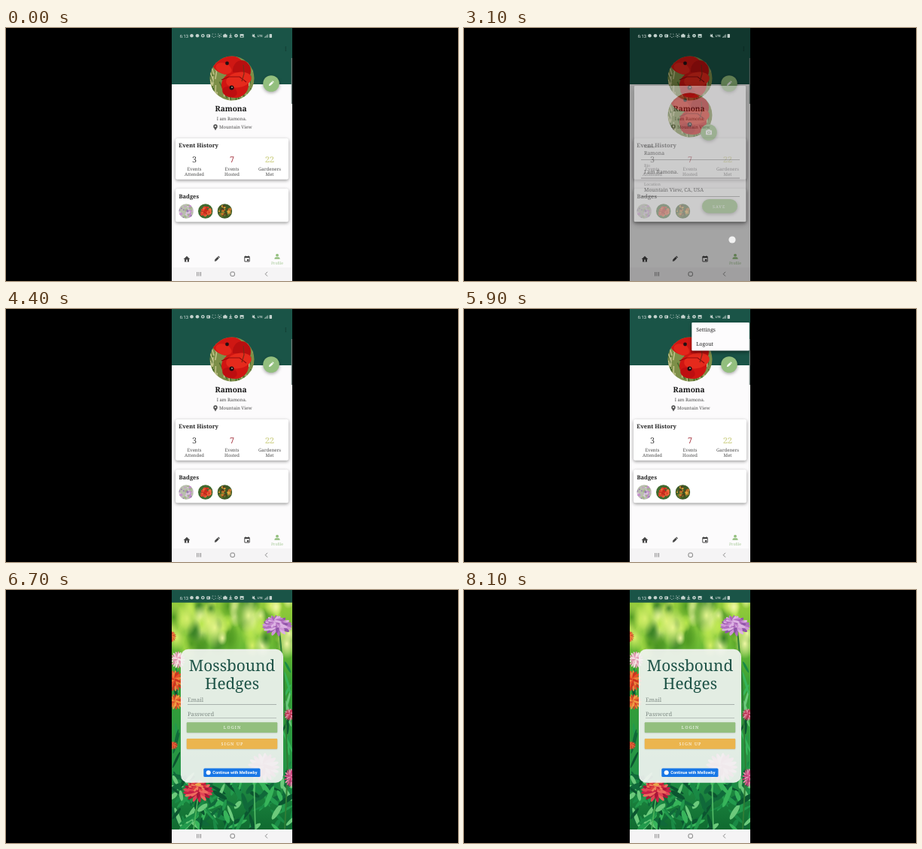
These frames come from a looping animation (600x337 px, 8.2 s). An HTML page with a canvas:

```html
<!DOCTYPE html>
<html lang="en">
<head>
<meta charset="utf-8">
<title>Garden app walkthrough</title>
<style>
html, body { margin: 0; width: 100%; height: 100%; overflow: hidden; background: #000; }
canvas { display: block; width: 600px; height: 337px; }
</style>
</head>
<body>
<canvas id="stage" width="600" height="337"></canvas>
<script>
const W = 600, H = 337, LOOP = 8200, STEP = 100;
const SERIF = '"Noto Serif", serif', SANS = 'Roboto, sans-serif';
const GREEN = '#1a5447', LEAF = '#93bf7e', INK = '#222', GREY = '#4d4d4d';
const USER = 'Ramona';

const screen = document.getElementById('stage').getContext('2d');
let c = screen;

// Paint a static picture once so that it can be faded as a whole.
function layer(paint) {
  const canvas = document.createElement('canvas');
  canvas.width = W;
  canvas.height = H;
  c = canvas.getContext('2d');
  c.textRendering = 'geometricPrecision';
  paint();
  c = screen;
  return canvas;
}

function rect(x, y, w, h, fill, r = 0) {
  c.fillStyle = fill;
  c.beginPath();
  c.roundRect(x, y, w, h, r);
  c.fill();
}

function oval(x, y, rx, ry, fill, turn = 0) {
  c.fillStyle = fill;
  c.beginPath();
  c.ellipse(x, y, rx, ry, turn, 0, 7);
  c.fill();
}

const disc = (x, y, r, fill) => oval(x, y, r, r, fill);

function poly(points, fill) {
  c.fillStyle = fill;
  c.beginPath();
  points.forEach(([x, y]) => c.lineTo(x, y));
  c.fill();
}

function line(points, color, width = 1) {
  c.strokeStyle = color;
  c.lineWidth = width;
  c.beginPath();
  points.forEach(([x, y]) => c.lineTo(x, y));
  c.stroke();
}

function text(str, x, y, size, color, { align = 'left', weight = 400, font = SERIF, gap = 0 } = {}) {
  c.font = `${weight} ${size}px ${font}`;
  c.letterSpacing = gap + 'px';
  c.textAlign = align;
  c.fillStyle = color;
  c.fillText(str, x + (align === 'center' ? gap / 2 : 0), y);
}

const centered = (str, x, y, size, color, more) => text(str, x, y, size, color, { align: 'center', ...more });

function raised(paint, blur = 4, drop = 1.5, alpha = 0.4) {
  c.save();
  c.shadowColor = `rgba(0,0,0,${alpha})`;
  c.shadowBlur = blur;
  c.shadowOffsetY = drop;
  paint();
  c.restore();
}

function clipped(path, paint) {
  c.save();
  c.beginPath();
  path();
  c.clip();
  paint();
  c.restore();
}

function seeded(seed) {
  return () => {
    seed = (seed * 16807) % 2147483647;
    return seed / 2147483647;
  };
}

function pencil(x, y, s, color) {
  c.save();
  c.translate(x, y);
  c.rotate(Math.PI / 4);
  rect(-s * 0.2, -s * 0.38, s * 0.4, s * 0.8, color);
  rect(-s * 0.2, -s * 0.65, s * 0.4, s * 0.19, color);
  poly([[-s * 0.2, s * 0.42], [s * 0.2, s * 0.42], [0, s * 0.68]], color);
  c.restore();
}

function poppies(x, y) {
  clipped(() => c.arc(x, y, 29.5, 0, 7), () => {
    c.translate(x, y);
    rect(-30, -30, 60, 60, '#7d8f48');
    const rnd = seeded(41);
    for (let i = 0; i < 50; i++) {
      const px = rnd() * 60 - 30, py = rnd() * 60 - 30;
      line([[px, py], [px + rnd() * 8 - 2, py + 11]], i % 2 ? '#c3c48c' : '#486a2a', 1.5);
    }
    oval(-5, -18, 21, 13, '#cf1713', 0.1);
    oval(13, -10, 12, 14, '#b80f0f');
    oval(-11, -13, 11, 7, '#e3261b', 0.4);
    oval(4, 9, 18, 17, '#d01512');
    oval(9, 2, 17, 10, '#e52a1c', -0.2);
    oval(-3, 18, 10, 7, '#bd0e10', 0.3);
    line([[-14, 2], [-4, -2], [10, -2], [19, 5]], '#8d0b0d', 1.2);
    line([[15, -18], [16, -6], [13, 4]], '#7c2a16', 1.2);
    disc(-6.5, -20, 2.4, '#241012');
    disc(-0.5, 12.5, 3, '#1d0c10');
    disc(0, 12, 1, '#a9a08a');
  });
}

function badge(x, back, tones, seed, spread) {
  clipped(() => c.arc(x, 244, 9.8, 0, 7), () => {
    rect(x - 10, 234, 20, 20, back);
    const rnd = seeded(seed);
    for (let i = 0; i < 38; i++) {
      const a = rnd() * 7, d = Math.sqrt(rnd()) * spread;
      disc(x + Math.cos(a) * d, 244 + Math.sin(a) * d, 0.9 + rnd() * 1.3, tones[i % tones.length]);
    }
  });
}

function systemBar() {
  const tint = '#6f6f6f';
  rect(220, 319, 160, 18, '#f5f4f5');
  for (const x of [253.7, 256.1, 258.5]) line([[x, 325], [x, 330.5]], tint, 0.8);
  c.lineWidth = 0.9;
  c.beginPath();
  c.roundRect(298, 325, 5.4, 5.4, 1.6);
  c.stroke();
  line([[347, 324.8], [344.2, 327.7], [347, 330.6]], tint, 0.8);
}

function statusBar() {
  const tint = '#c3d2cd';
  text('6:13', 230.7, 12.7, 5.9, '#d9e3e0', { font: SANS });
  for (const x of [246.5, 254, 261.3, 305.5]) disc(x, 10.3, 2.3, tint);
  disc(261.3, 10.3, 1, GREEN);
  disc(305.5, 10.3, 0.8, GREEN);
  rect(266.3, 8.6, 4.8, 3.8, tint, 0.6);
  rect(267.4, 9.8, 1.7, 1.3, GREEN);
  for (const x of [276, 283.5]) {
    c.setLineDash([1.5, 2]);
    line([[x - 2.2, 8], [x + 2.2, 8], [x + 2.2, 12.5], [x - 2.2, 12.5], [x - 2.2, 8]], tint, 0.7);
    c.setLineDash([]);
  }
  rect(282.7, 9.5, 1.6, 1.6, tint);
  rect(288.2, 8.8, 5.4, 3.8, tint, 0.6);
  rect(289.8, 7.8, 2.2, 1.2, tint);
  rect(297.6, 7.6, 1, 3, tint);
  poly([[296, 10], [300.2, 10], [298.1, 12]], tint);
  rect(296, 12.2, 4.2, 0.8, tint);
  rect(310.6, 8, 5, 4.8, tint, 0.6);
  poly([[311.3, 12], [313, 9.9], [314.9, 12]], GREEN);
  poly([[326.8, 9.3], [328.2, 9.3], [330, 7.8], [330, 12.9], [328.2, 11.5], [326.8, 11.5]], tint);
  line([[327, 7.8], [331.6, 12.8]], tint, 0.7);
  text('LTE', 333.8, 12.2, 4.2, tint, { font: SANS, weight: 700 });
  for (let i = 0; i < 4; i++) rect(343.2 + i * 1.2, 11.8 - i * 1.1, 0.8, 1 + i * 1.1, tint);
  rect(349.6, 8, 3.4, 4.9, tint, 0.7);
}

function bottomNav() {
  poly([[235.7, 308], [240, 303.8], [244.3, 308]], '#444');
  rect(237, 307, 6, 4.5, '#444');
  rect(239.2, 308.6, 1.6, 3, '#fcfbfc');
  pencil(280, 307.5, 6.6, '#444');
  rect(316.3, 304, 7.4, 7.4, '#444', 0.8);
  rect(317.2, 306.2, 5.6, 4.3, '#fcfbfc');
  rect(320, 308, 2.3, 2.2, '#444');
  rect(317.7, 303.2, 0.9, 1.2, '#444');
  rect(321.4, 303.2, 0.9, 1.2, '#444');
  disc(360, 302.7, 1.9, LEAF);
  rect(356.4, 305.2, 7.2, 2.6, LEAF, [2, 2, 0, 0]);
  centered('Profile', 360, 314.5, 5.1, '#a5c996');
}

function fab(x, y) {
  raised(() => disc(x, y, 10.8, LEAF), 4, 1.5, 0.35);
}

function profilePage() {
  rect(220, 0, 160, H, '#fcfbfc');
  rect(220, 0, 160, 75, GREEN);
  for (const y of [25.5, 27.7, 29.9]) disc(371.3, y, 0.75, '#10362e');
  rect(378.7, 40, 1.3, 61, '#6f7f7a');
  poppies(300, 67);
  fab(352, 74);
  pencil(352, 74, 6.4, '#fff');

  centered(USER, 298.6, 110.8, 10.1, '#151515', { weight: 700 });
  centered(`I am ${USER}.`, 299.5, 123, 6, GREY);
  disc(278, 130.9, 2.7, '#555');
  poly([[275.5, 131.9], [280.5, 131.9], [278, 136.4]], '#555');
  disc(278, 130.9, 1, '#fcfbfc');
  text('Mountain View', 283, 134.4, 5.95, GREY);

  raised(() => rect(225, 147, 150, 54.8, '#fff', 2.5));
  text('Event History', 229.3, 159.4, 7.6, INK, { weight: 700 });
  const stats = [
    [250, '3', '#444', 'Events', 'Attended'],
    [300, '7', '#a5343f', 'Events', 'Hosted'],
    [350, '22', '#d5d798', 'Gardeners', 'Met']
  ];
  for (const [x, count, color, top, low] of stats) {
    centered(count, x, 179.4, 10.8, color, { weight: count === '22' ? 700 : 400 });
    centered(top, x, 189.6, 6, GREY);
    centered(low, x, 197.2, 6, GREY);
  }

  raised(() => rect(225, 214, 150, 44.3, '#fff', 2.5));
  text('Badges', 229.5, 227.4, 7.5, INK, { weight: 700 });
  badge(239.2, '#b9bfae', ['#c58fcd', '#d9c4dc', '#9a7fb0', '#a3b58c'], 17, 10);
  badge(264.8, '#3f6b2e', ['#e0402a', '#c92a1c', '#ee6b3c'], 29, 6.5);
  badge(290.4, '#3d5a26', ['#c9792a', '#e0a63c', '#6d7d2c', '#5a3a1a'], 53, 7.5);
  bottomNav();
  systemBar();
}

function dialog() {
  raised(() => rect(226, 77, 148, 181, '#fbfafb', 1), 9, 3, 0.5);
  poppies(300, 116);
  fab(325, 139);
  rect(321, 136.3, 8, 6, '#fff', 0.8);
  rect(323.2, 135.2, 3.6, 2, '#fff', 0.5);
  disc(325, 139.3, 1.9, LEAF);
  disc(325, 139.3, 1.1, '#fff');
  const fields = [['Name', USER], ['Bio', `I am ${USER}.`], ['Location', 'Mountain View, CA, USA']];
  fields.forEach(([label, value], i) => {
    const y = 160.3 + i * 24.7;
    text(label, 239, y, 5.25, '#777');
    text(value, 239, y + 8.6, 6.85, INK);
    rect(235, y + 14.6, 131, 0.8, '#777');
  });
  raised(() => rect(316, 228, 47, 18.8, LEAF, 9.4), 4, 1.5, 0.35);
  centered('SAVE', 338.2, 239.8, 5.4, '#fff', { gap: 1 });
}

function menu() {
  raised(() => rect(302.3, 18, 76.5, 37.5, '#fdfcfd', 1), 5, 2, 0.45);
  text('Settings', 308.2, 29.9, 6.9, INK);
  text('Logout', 308.2, 48.5, 6.9, INK);
}

// A soft, upright patch of light or shade.
function glow(x, y, r, color) {
  c.save();
  c.translate(x, y);
  c.scale(0.75, 1.15);
  const g = c.createRadialGradient(0, 0, 0, 0, 0, r);
  g.addColorStop(0, color);
  g.addColorStop(1, color + '00');
  disc(0, 0, r, g);
  c.restore();
}

// Two rings of narrow petals, the inner one raised towards the centre.
function bloom(x, y, rx, ry, tones) {
  [[0.62, 17], [0.34, 11]].forEach(([reach, count], ring) => {
    for (let i = 0; i < count; i++) {
      const a = i / count * Math.PI * 2 + ring;
      const dx = Math.cos(a) * rx * reach, dy = Math.sin(a) * ry * reach;
      oval(x + dx, y + dy - ring * ry * 0.15, rx * 0.38, rx * 0.12, tones[(i + ring) % tones.length], Math.atan2(dy, dx));
    }
  });
}

function meadow() {
  const g = c.createLinearGradient(0, 17, 0, 319);
  g.addColorStop(0, '#93cb3a');
  g.addColorStop(0.18, '#6fbb35');
  g.addColorStop(0.35, '#37a035');
  g.addColorStop(0.75, '#239447');
  g.addColorStop(1, '#0f6a30');
  rect(220, 16, 160, 303, g);
  const rnd = seeded(73);
  const light = ['#d9f06a', '#4f9a22', '#b8e64c', '#3a8226', '#eef7a4'];
  for (let i = 0; i < 60; i++) {
    glow(220 + rnd() * 160, 12 + rnd() * 62, 8 + rnd() * 11, light[i % 5]);
  }
  glow(277, 50, 24, '#e6f58a');
  glow(322, 34, 20, '#e2f48e');
  glow(240, 38, 20, '#d5ee6c');
  // Stems and leaves grow denser towards the bottom edge.
  const leaf = ['#1a8a45', '#37b45a', '#0b5530', '#22994c', '#6cca7c', '#10693a'];
  for (let i = 0; i < 24; i++) {
    oval(rnd() < 0.5 ? 226 : 374, 100 + rnd() * 150, 1.6, 8 + rnd() * 9, leaf[i % 6], rnd() - 0.5);
  }
  for (let i = 0; i < 130; i++) {
    const x = 220 + rnd() * 160, y = 250 + rnd() * 72;
    oval(x, y, 1.4 + rnd() * 2, 6 + rnd() * 10, leaf[i % 6], rnd() * 2.4 - 1.2);
  }
  line([[363, 54], [369, 120], [374, 240], [370, 319]], '#2f7d36', 2);
  line([[255, 275], [249, 319]], '#4cb35a', 1.8);
  line([[329, 250], [331, 319]], '#55bd68', 1.6);

  bloom(360, 48, 20, 10, ['#b06fc0', '#cf96d8', '#8f55a8', '#dcb2e2']);
  bloom(357, 42, 13, 6, ['#c587d0', '#a965b8', '#ddb4e4']);
  bloom(220, 62, 6, 8, ['#d9452f', '#ec7a3b']);
  bloom(228, 93, 10, 12, ['#f0c3d0', '#e093ad', '#f6e2e4']);
  bloom(224, 121, 12, 15, ['#e64f2a', '#f0813c', '#cf331f']);
  bloom(225, 149, 11, 10, ['#e8752e', '#d64429', '#f09a45']);
  bloom(222, 207, 6, 5, ['#d33b2b', '#e06a3a']);
  bloom(342, 236, 21, 18, ['#d889ae', '#e4a7c4', '#c96d9d']);
  bloom(377, 166, 8, 8, ['#d04a6a', '#e58aa6', '#b8304f']);
  bloom(378, 250, 9, 14, ['#d9558e', '#e78ab0', '#c23d75']);
  bloom(255, 268, 20, 12, ['#c81f45', '#e24455', '#a81638', '#ee6a5e']);
  bloom(254, 261, 12, 6, ['#e0433f', '#c5203c', '#f0805c']);
  oval(255, 259, 4, 1.8, '#e8a64a');
}

function loginPage() {
  clipped(() => c.rect(220, 0, 160, H), () => {
    meadow();
    rect(220, 0, 160, 16.7, GREEN);
    systemBar();
  });
  rect(232, 78.8, 136, 178, 'rgba(244,246,245,0.91)', 10);
  centered('Mossbound', 300, 108.4, 20.8, '#1d5246');
  centered('Hedges', 300, 132.4, 20.8, '#1d5246');
  [['Email', 149.4], ['Password', 167.5]].forEach(([label, y]) => {
    text(label, 241, y, 7.65, '#7e8a84');
    rect(241, y + 2.7, 118, 0.8, '#a9b1ad');
  });
  [['LOGIN', 176.3, LEAF], ['SIGN UP', 198, '#ebb54e']].forEach(([label, y, color]) => {
    raised(() => rect(239.8, y, 120.4, 13.8, color, 1), 1.5, 0.4, 0.2);
    centered(label, 300, y + 9, 5.6, '#fff', { gap: 1.1, weight: 500 });
  });
  rect(262.3, 237.4, 75.2, 11.5, '#1877e6', 1.5);
  disc(268.7, 243.2, 3, '#fff');
  text('Continue with Mellowby', 274.3, 245.1, 5.5, '#fff', { font: SANS, weight: 700 });
}

// Linear interpolation through [time, value] pairs.
function track(t, keys) {
  if (t <= keys[0][0]) return keys[0][1];
  for (let i = 1; i < keys.length; i++) {
    const [t0, v0] = keys[i - 1], [t1, v1] = keys[i];
    if (t <= t1) return v0 + (v1 - v0) * (t - t0) / (t1 - t0);
  }
  return keys[keys.length - 1][1];
}

const DIM = [[1800, 0], [1900, 0.2], [2000, 0.5], [2100, 0.6], [3000, 0.6], [3100, 0.35], [3200, 0.1], [3300, 0]];
const DIALOG = [[1800, 0], [1900, 0.88], [2000, 1], [3000, 1], [3100, 0.45], [3200, 0]];
const MENU = [[4900, 0], [5000, 0.6], [5100, 1], [6300, 1], [6400, 0]];
const LOGIN = [[6400, 0], [6500, 0.5], [6600, 0.9], [6700, 1]];

const pages = {
  profile: layer(profilePage),
  dialog: layer(dialog),
  menu: layer(menu),
  login: layer(loginPage),
  status: layer(statusBar)
};

function put(page, alpha = 1) {
  if (alpha <= 0) return;
  c.globalAlpha = alpha;
  c.drawImage(page, 0, 0);
  c.globalAlpha = 1;
}

function touch(t, from, to, x, y) {
  if (t >= from && t < to) disc(x, y, 4.6, 'rgba(255,255,255,0.85)');
}

function draw(t) {
  rect(0, 0, W, H, '#000');
  put(pages.profile);
  touch(t, 1800, 2000, 352, 74);
  rect(220, 0, 160, H, `rgba(0,0,0,${track(t, DIM)})`);
  put(pages.dialog, track(t, DIALOG));
  touch(t, 3000, 3200, 356, 282);
  put(pages.menu, track(t, MENU));
  put(pages.login, track(t, LOGIN));
  put(pages.status);
}

const start = performance.now();
let shown = -1;
function tick() {
  const t = Math.floor((performance.now() - start) % LOOP / STEP) * STEP;
  if (t !== shown) draw(shown = t);
  requestAnimationFrame(tick);
}
draw(0);
tick();
</script>
</body>
</html>
```
